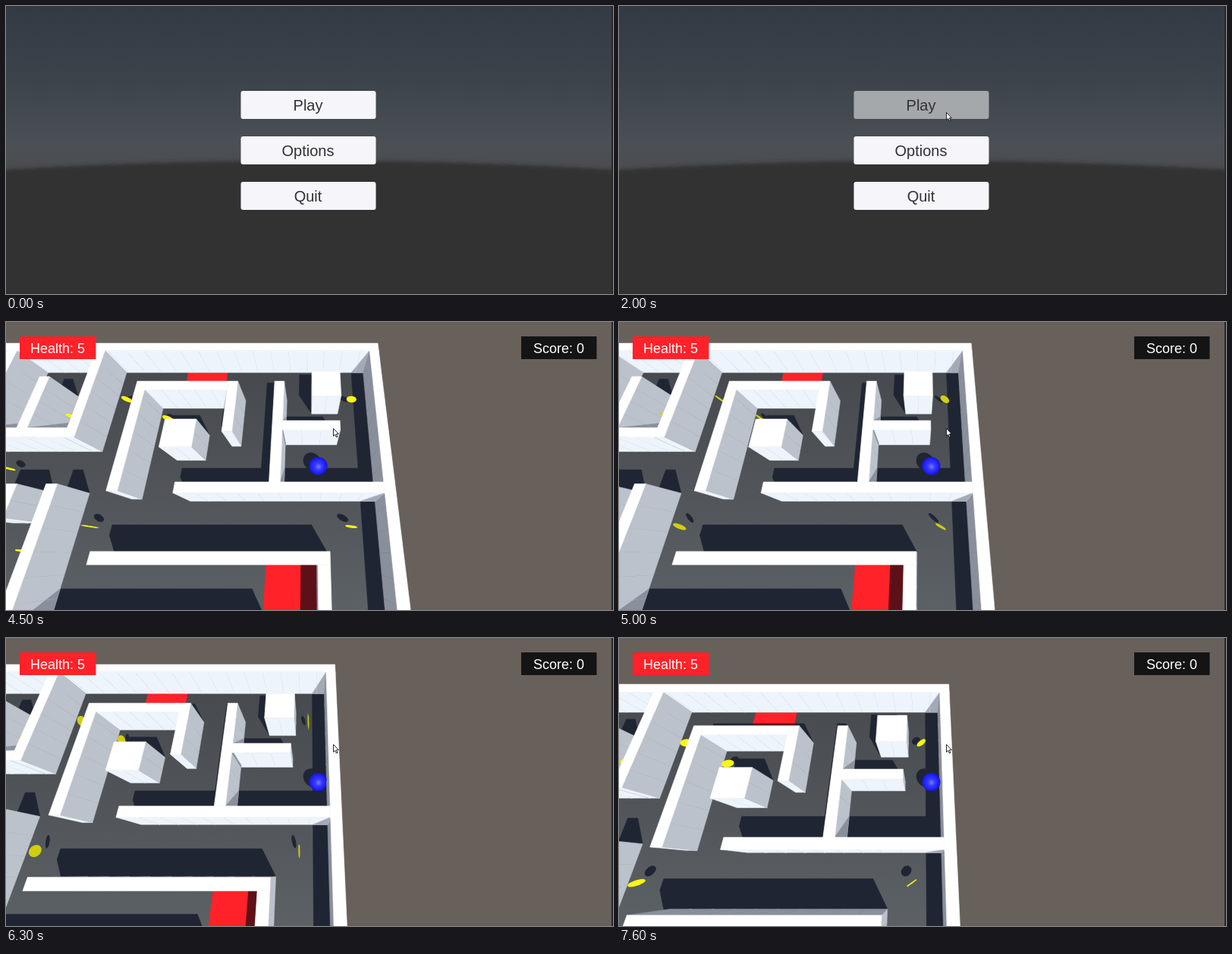
Recreate the animation shown at these times as an HTML page with a canvas. Size 800 by 380 pixels, loop 7.7 s.

```html
<!DOCTYPE html>
<html>
<head>
<meta charset="utf-8">
<title>Maze game</title>
<style>
html, body { margin: 0; width: 100%; height: 100%; overflow: hidden; background: #68605a; }
canvas, svg { position: absolute; left: 0; top: 0; width: 800px; height: 380px; display: block; }
text { font-family: "Liberation Sans", Arial, sans-serif; text-anchor: middle; }
#menu text { font-size: 20px; fill: #2f3136; }
#hud text { font-size: 18px; fill: #fff; }
</style>
</head>
<body>
<canvas id="maze" width="800" height="380"></canvas>
<svg viewBox="0 0 800 380">
  <defs>
    <linearGradient id="sky" x1="0" y1="0" x2="0" y2="216" gradientUnits="userSpaceOnUse">
      <stop offset="0" stop-color="#333a44"/>
      <stop offset=".45" stop-color="#3c434b"/>
      <stop offset=".85" stop-color="#4b5055"/>
      <stop offset="1" stop-color="#4a4d50"/>
    </linearGradient>
    <filter id="soft" x="-5%" y="-5%" width="110%" height="110%"><feGaussianBlur stdDeviation="2.5"/></filter>
  </defs>
  <g id="menu">
    <rect width="800" height="380" fill="url(#sky)"/>
    <path d="M-20 217Q399 191 820 217V400H-20Z" fill="#303030" filter="url(#soft)"/>
    <rect id="play" x="309.5" y="112" width="178" height="37" rx="3"/>
    <rect x="309.5" y="172" width="178" height="37" rx="3" fill="#f6f5f9"/>
    <rect x="309.5" y="232" width="178" height="37" rx="3" fill="#f6f5f9"/>
    <text x="398" y="137.5">Play</text>
    <text x="398" y="197.5">Options</text>
    <text x="398" y="257.5">Quit</text>
  </g>
  <g id="hud">
    <rect x="18" y="19" width="100.5" height="30" fill="#ff2229"/>
    <text x="68" y="41">Health: 5</text>
    <rect x="679" y="19" width="99.5" height="30" fill="#141414"/>
    <text x="728.5" y="41">Score: 0</text>
  </g>
  <rect x="798" width="2" height="380" fill="#26282c"/>
  <path id="cursor" d="M.5 .5V10.5L2.8 8.4L4.4 12L6 11.3L4.4 7.8H7.4Z" fill="#fff" stroke="#111" stroke-width=".9"/>
</svg>
<script>
const $ = id => document.getElementById(id);
const g = $('maze').getContext('2d');
const LOOP = 7700, F = 329, S = Math.sin(70 * Math.PI / 180), C = Math.cos(70 * Math.PI / 180);
const CAM_H = 100, WALL_H = 14, LX = .42, LZ = .727;   // light shifts shadows by -LX, +LZ per unit of height
const FACE = { s: '#eef4fb', e: '#bcc2cb', w: '#8a8f9c', n: '#8a8f9c' };
const SHADE = { s: '#a3a9b5', e: '#8a8f9c' };

// x0, x1, z0, z1
const boxes = [
  [-160, 31.1, 85.5, 89.7], [27.1, 31.1, -60, 85.5],
  [-47.7, 27.1, 21.2, 25.2], [-14, -10, 25.2, 69.1], [-10, 12.5, 46.3, 50.3],
  [1.6, 13.5, 62, 74],
  [-71.5, -67.5, 22, 69.1], [-67.5, -33.4, 65, 69.1], [-33.4, -29.4, 45.6, 69.1],
  [-56.3, -44, 39, 51],
  [-71, 7.2, -2.4, 1.6], [3.2, 7.2, -60, -2.4], [-90, -14.4, -25.1, -21.1],
  [-93.6, -89.6, 43.1, 85.5], [-160, -93.6, 43.1, 47.1],
  [-113.2, -109.1, 47.1, 71.5], [-132.4, -128.4, 47.1, 85.5],
  [-93.6, -89.6, -60, 24.5], [-116, -104, 12.5, 24.5]
];
const pads = [[-59.2, -39.7, 65.5, 85.5], [-15.8, 4, -22.4, -2.4]];
const coins = [[16, 10.5], [-80.6, 10.5], [19.3, 66.1], [-80.9, 66.1],
  [-60.8, 56.4], [-102.4, 57.2], [-120.6, 33.4], [-102, 2]];

let cx = 0, cz = 0;
function project([x, y, z]) {
  const d = CAM_H - y, dz = z - cz, depth = d * S + dz * C;
  return [399 + F * (x - cx) / depth, 190 - F * (dz * S - d * C) / depth];
}

function trace(pts) {
  g.beginPath();
  pts.forEach(p => g.lineTo(...project(p)));
  g.closePath();
}
function poly(pts, color, line = .6) {
  trace(pts);
  g.fillStyle = g.strokeStyle = color;
  g.lineWidth = line;
  g.fill();
  if (line) g.stroke();
}
const slab = ([a, b, c, d], y) => [[a, y, c], [b, y, c], [b, y, d], [a, y, d]];
const corners = b => [...slab(b, 0), ...slab(b, WALL_H)];

function hull(pts) {
  pts.sort((a, b) => a[0] - b[0] || a[1] - b[1]);
  const half = list => {
    const out = [];
    for (const p of list) {
      while (out.length > 1) {
        const [a, b] = out.slice(-2);
        if ((b[0] - a[0]) * (p[1] - a[1]) - (b[1] - a[1]) * (p[0] - a[0]) > 0) break;
        out.pop();
      }
      out.push(p);
    }
    out.pop();
    return out;
  };
  return [...half(pts), ...half(pts.slice().reverse())];
}

function cut(pts, axis, limit, sign) {
  const out = [];
  pts.forEach((p, i) => {
    const q = pts[(i + 1) % pts.length];
    const a = sign * (p[axis] - limit), b = sign * (q[axis] - limit);
    if (a >= 0) out.push(p);
    if (a * b < 0) {
      const k = a / (a - b);
      out.push([p[0] + (q[0] - p[0]) * k, p[1] + (q[1] - p[1]) * k]);
    }
  });
  return out;
}

const onFloor = ([x, y, z]) => [x - LX * y, z + LZ * y];
const floorShadows = boxes.map(b => hull(corners(b).map(onFloor)).map(([x, z]) => [x, 0, z]));

// Outlines of the shadows that fall on one lit wall, in (along, height)
function wallShadows(side, at) {
  const out = [];
  for (const b of boxes) {
    const [x0, x1, z0, z1] = b;
    const part = side === 'e' ? [Math.max(x0, at), x1, z0, z1] : [x0, x1, z0, Math.min(z1, at)];
    if (part[1] - part[0] < .01 || part[3] - part[2] < .01) continue;
    out.push(hull(corners(part).map(([x, y, z]) => {
      const t = side === 'e' ? (x - at) / LX : (at - z) / LZ;
      return side === 'e' ? [z + LZ * t, y - t] : [x - LX * t, y - t];
    })));
  }
  return out;
}

const faces = [];
for (const [x0, x1, z0, z1] of boxes) {
  for (const [side, at, from, to] of [['e', x1, z0, z1], ['w', x0, z0, z1], ['s', z0, x0, x1], ['n', z1, x0, x1]]) {
    const alongZ = side === 'e' || side === 'w';
    const place = ([u, y]) => alongZ ? [at, y, u] : [u, y, at];
    const dark = SHADE[side] ? wallShadows(side, at) : [];
    const n = Math.ceil((to - from) / 8), step = (to - from) / n;
    for (let i = 0; i < n; i++) {
      const a = from + i * step, b = a + step;
      const shadows = dark
        .map(p => cut(cut(cut(cut(p, 0, a, 1), 0, b, -1), 1, 0, 1), 1, WALL_H, -1))
        .filter(p => p.length > 2)
        .map(p => p.map(place));
      faces.push({ side, at, shadows, mid: place([(a + b) / 2, 0]),
        quad: [[a, 0], [b, 0], [b, WALL_H], [a, WALL_H]].map(place) });
    }
  }
}

function faceSeen({ side, at }) {
  return side === 'e' ? cx > at : side === 'w' ? cx < at : side === 's' ? cz < at : cz > at;
}
function drawFace(f) {
  poly(f.quad, FACE[f.side]);
  f.shadows.forEach(s => poly(s, SHADE[f.side]));
}

const ring = fn => Array.from({ length: 24 }, (_, i) => fn(Math.cos(i * Math.PI / 12), Math.sin(i * Math.PI / 12)));
const coinDisc = ([x, z], a) => ring((c, s) => [x + 1.95 * c * Math.cos(a), 5.5 + 1.95 * s, z + 1.95 * c * Math.sin(a)]);

function drawBall() {
  const shine = g.createRadialGradient(412, 191, 1, 411, 190, 12.5);
  shine.addColorStop(0, '#6a70ff');
  shine.addColorStop(.3, '#3a3cff');
  shine.addColorStop(.75, '#1f1ff8');
  shine.addColorStop(1, '#1414c8');
  g.fillStyle = shine;
  g.beginPath();
  g.arc(411.5, 190, 12, 0, 7);
  g.fill();
}

function drawMaze(t) {
  cx = Math.min(19.5, 25 * Math.max(0, t - 4.4) ** 2);
  cz = 2.35 * Math.max(0, t - 5.17) ** 2;
  const spin = (70 - 44 * (t - 2.7)) * Math.PI / 180;

  g.fillStyle = '#68605a';
  g.fillRect(0, 0, 800, 380);
  const ground = g.createLinearGradient(0, 60, 0, 380);
  ground.addColorStop(0, '#46494d');
  ground.addColorStop(1, '#5c6165');
  poly(slab([-200, 31, -60, 89], 0), ground, 0);

  const dark = '#1f2533';
  floorShadows.forEach(s => poly(s, dark));
  const discs = coins.map(c => coinDisc(c, spin));
  discs.forEach(d => poly(d.map(p => { const [x, z] = onFloor(p); return [x, 0, z]; }), dark, 1));
  const bx = cx + 3.74, bz = cz + 35.1;
  poly(ring((c, s) => {
    const u = 4.5 * s, v = 3.7 * c;
    return [bx - 2.2 + v * .866 - u * .5, 0, bz + 3.2 + v * .5 + u * .866];
  }), dark, 0);

  for (const p of pads) {
    poly(slab(p, 0), '#ff2229', 0);
    g.save();
    trace(slab(p, 0));
    g.clip();
    floorShadows.forEach(s => poly(s, '#5e1018'));
    g.restore();
  }

  const glow = .55 + .45 * Math.min(1, 1.6 * Math.abs(LX * Math.sin(spin) + LZ * Math.cos(spin)));
  const gold = `rgb(${250 * glow | 0},${245 * glow | 0},${20 * glow | 0})`;
  const far = (x, z) => Math.hypot(x - cx, z - cz);
  const items = faces.filter(faceSeen).map(f => [far(f.mid[0], f.mid[2]), () => drawFace(f)]);
  coins.forEach((c, i) => items.push([far(...c), () => poly(discs[i], gold, 1.5)]));
  items.push([far(bx, bz), drawBall]);
  items.sort((a, b) => b[0] - a[0]).forEach(i => i[1]());

  boxes.forEach(b => poly(slab(b, WALL_H), '#fff'));
}

function cursorAt(t) {
  if (t < .9) return [-30, -30];
  if (t >= 1.5) return [431, 140];
  const k = Math.min(1, (t - .9) / .3);
  return [560 - 143 * k, 330 - 201 * k];
}

function draw(ms) {
  const t = Math.floor(ms / 100) / 10;   // ten pictures a second
  const playing = t >= 2.1;
  $('menu').style.display = playing ? 'none' : '';
  $('hud').style.display = playing ? '' : 'none';
  $('play').setAttribute('fill', t < 1.7 ? '#f6f5f9' : t < 1.8 ? '#cccdd0' : '#a5a8aa');
  $('cursor').setAttribute('transform', `translate(${cursorAt(t)})`);
  if (playing) drawMaze(t);
}

const start = performance.now();
function tick() {
  draw((performance.now() - start) % LOOP);
  requestAnimationFrame(tick);
}
tick();
</script>
</body>
</html>
```
